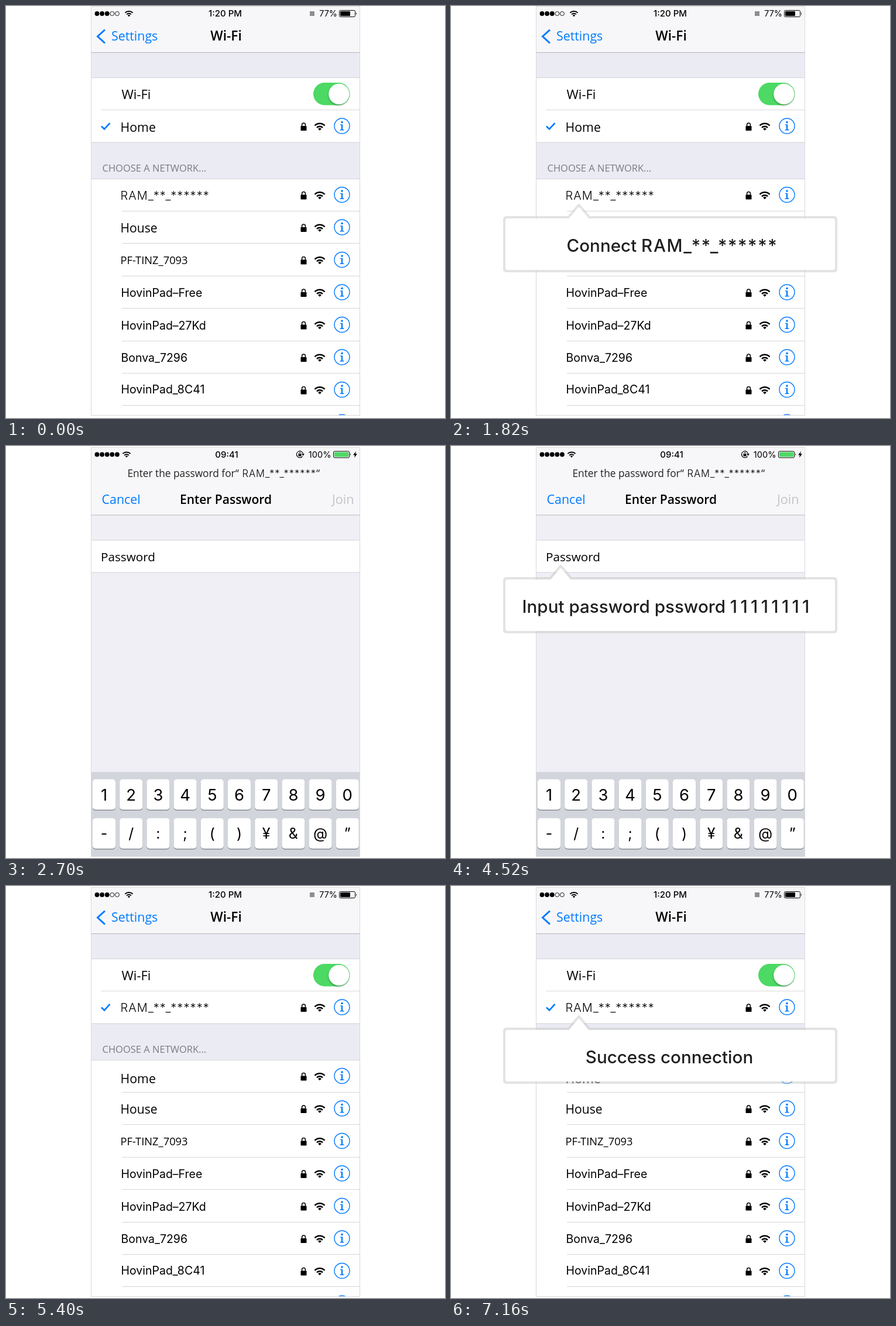
An HTML page for the animation above (8000 ms loop, 750 by 704 pixels).

```html
<!DOCTYPE html>
<html lang="en">
<head>
<meta charset="utf-8">
<title>Joining a Wi-Fi network</title>
<style>
html, body { margin: 0; width: 100%; height: 100%; overflow: hidden; background: #fff; }
svg { display: block; width: 750px; height: 704px; }
text { white-space: pre; }
.ui { font-family: "Open Sans", "Noto Sans", sans-serif; }
.sys { font-family: Inter, Roboto, sans-serif; }
.medium { font-weight: 500; }
.bold { font-weight: 600; }
.mid { text-anchor: middle; }
.end { text-anchor: end; }
.blue { fill: #007aff; }
.line { fill: none; stroke: #007aff; }
.mask { letter-spacing: .055em; }
.ones { letter-spacing: .18em; }
.scene { visibility: hidden; animation: 8s step-end infinite; }
#list { animation-name: list; }
#pick { animation-name: pick; }
#form { animation-name: form; }
#type { animation-name: type; }
#done { animation-name: done; }
#joined { animation-name: joined; }
@keyframes list   { 0% { visibility: visible } 33.75%, 100% { visibility: hidden } }
@keyframes pick   { 0% { visibility: hidden } 6.25% { visibility: visible } 33.75%, 100% { visibility: hidden } }
@keyframes form   { 0% { visibility: hidden } 33.75% { visibility: visible } 67.5%, 100% { visibility: hidden } }
@keyframes type   { 0% { visibility: hidden } 40% { visibility: visible } 67.5%, 100% { visibility: hidden } }
@keyframes done   { 0% { visibility: hidden } 67.5%, 100% { visibility: visible } }
@keyframes joined { 0% { visibility: hidden } 73.75%, 100% { visibility: visible } }
</style>
</head>
<body>
<svg id="stage" viewBox="0 0 750 704" xmlns="http://www.w3.org/2000/svg">
  <defs>
    <clipPath id="phone"><rect x="145" y="0" width="460" height="700"/></clipPath>
    <filter id="soft" x="-30%" y="-30%" width="160%" height="160%"><feGaussianBlur stdDeviation="1.6"/></filter>
    <g id="fan">
      <path d="M0 6.8L-2.9 3.9A4.1 4.1 0 0 1 2.9 3.9Z"/>
      <path d="M-5 1.8A7.1 7.1 0 0 1 5 1.8M-8.5 -1.7A12 12 0 0 1 8.5 -1.7" fill="none" stroke="#000" stroke-width="2.5"/>
    </g>
    <g id="lock">
      <rect x="-5" y="-1" width="10" height="8" rx=".8"/>
      <path d="M-2.9 0V-3.2A2.9 2.9 0 0 1 2.9 -3.2V0" fill="none" stroke="#000" stroke-width="1.5"/>
    </g>
    <g id="info">
      <circle r="13" class="line" stroke-width="1.4"/>
      <circle cy="-6.4" r="1.8" class="blue"/>
      <path class="blue" d="M-3.2 -2.8H1.2V6H3.4V7.4H-3.4V6H-1.2V-1.4H-3.2Z"/>
    </g>
    <g id="icons">
      <use href="#lock" x="508.5" y="1"/>
      <use href="#fan" x="536" y="1"/>
      <use href="#info" x="574"/>
    </g>
  </defs>
</svg>
<script>
const stage = document.getElementById("stage");
const rect = (x, y, w, h, fill, more = "") =>
  `<rect x="${x}" y="${y}" width="${w}" height="${h}" fill="${fill}" ${more}/>`;
const rule = (y, x = 146, color = "#d3d3d8") => rect(x, y, 604 - x, 1, color);
const text = (s, x, y, size, cls, more = "") =>
  `<text x="${x}" y="${y}" font-size="${size}" class="${cls}" ${more}>${s}</text>`;
const times = (n, fn) => Array.from({ length: n }, (_, i) => fn(i)).join("");
const scene = (id, body, dy = 0) => `<g id="${id}" class="scene" transform="translate(0 ${dy})">${body}</g>`;
const frame = rect(145.5, .5, 459, 699, "none", 'stroke="#d9d9dc"');

const signal = (full, y, wifiX) =>
  times(5, i => i < full
    ? `<circle cx="${155.5 + i * 8.6}" cy="${y}" r="3.9"/>`
    : `<circle cx="${155.5 + i * 8.6}" cy="${y}" r="3.5" fill="none" stroke="#000" stroke-width=".9"/>`) +
  `<use href="#fan" transform="translate(${wifiX} ${y}) scale(.78)"/>`;

const battery = (x, y, w, fill) =>
  rect(x + .5, y + .5, 27, 11, "none", 'rx="2" stroke="#000"') +
  rect(x + 2, y + 2, w, 8, fill, 'rx=".8"') +
  `<path d="M${x + 29} ${y + 4}q2 2 0 4z"/>`;

// Each name: text, class, size, x, weight, baseline below the row centre
const mask = "RAM_**_******";
const ram = [mask, "sys mask", 20, 195.5, 300];
const home = ["Home", "ui", 21.3, 195.5, 400];
const others = [
  ["House", "ui", 21.1, 195.5, 400, 9],
  ["PF-TINZ_7093", "ui", 18.3, 195.5, 400, 7],
  ["HovinPad–Free", "sys", 19.5, 196.5, 400, 8],
  ["HovinPad–27Kd", "sys", 19.5, 196.5, 400, 8],
  ["Bonva_7296", "sys", 19.5, 196.5, 400, 8],
  ["HovinPad_8C41", "sys", 19.5, 196.5, 400, 6]
];
const label = ([s, cls, size, x, weight], y) => text(s, x, y, size, cls, `font-weight="${weight}"`);

function listScreen(joined, joinedY, first, firstY) {
  const rowY = i => 322.5 + 55.5 * i;
  return `<g clip-path="url(#phone)">` +
    rect(146, 0, 458, 79, "#f7f7f9") + rule(79, 146, "#b4b4b9") +
    rect(146, 80, 458, 42, "#ebebf4") + rule(122) +
    rect(146, 123, 458, 577, "#fff") + rule(177, 162, "#d9d9dc") +
    rect(146, 233, 458, 62, "#ebebf4") + rule(232.5) + rule(295) +
    signal(3, 13, 210) +
    text("1:20 PM", 374.5, 18, 15, "sys medium mid") +
    rect(519, 9, 8, 8, "#8e8e92") +
    text("77%", 566, 18, 14.4, "sys end") + battery(569, 7, 17, "#000") +
    `<path class="line" d="M169 40.5L156.5 52L169 63.5" stroke-width="3"/>` +
    text("Settings", 180, 59, 21.4, "ui blue") +
    text("Wi-Fi", 376, 59, 22.7, "ui bold mid") +
    text("Wi-Fi", 197.5, 159, 22, "ui") +
    rect(525, 131, 62.5, 38.5, "#4cd964", 'rx="19.25"') +
    `<circle cx="568.5" cy="152.5" r="17.5" fill="#000" opacity=".28" filter="url(#soft)"/>
     <circle cx="568.9" cy="150.4" r="17.7" fill="#fff"/>
     <path class="line" d="M163 205.5L168 210.3L177.5 200" stroke-width="2.6"/>
     <use href="#icons" y="205"/>` +
    label(joined, joinedY) +
    text("CHOOSE A NETWORK...", 164.5, 283, 16.5, "ui", 'fill="#7b7b80"') +
    label(first, firstY) +
    others.map((n, i) => label(n, rowY(i + 1) + n[5])).join("") +
    times(8, i => `<use href="#icons" y="${rowY(i)}"/>`) +
    times(7, i => rule(Math.floor(350.2 + 55.45 * i), 198, "#d6d6d9")) +
    frame + `</g>`;
}

function key(char, i, row) {
  const x = 148 + i * 46.2, y = row ? 634 : 567.5;
  return rect(x, y + 1.4, 39, 52, "#898c91", 'rx="5"') + rect(x, y, 39, 52, "#fff", 'rx="5"') +
    text(char, x + 19.5, row ? 669 : 604, row ? 25 : 27.5, "sys mid");
}

const keys = ["1234567890", "-/:;()¥&@”"].map((chars, row) =>
  [...chars].map((c, i) => key(c === "&" ? "&amp;" : c, i, row)).join("")).join("");

const formScreen =
  rect(146, 0, 458, 700, "#efeff5") +
  rect(146, 0, 458, 116, "#f7f7f9") + rule(115.5, 146, "#b8b8bd") +
  rect(146, 159, 458, 55, "#fff") + rule(158.5) + rule(213.5) +
  rect(146, 555, 458, 145, "#d2d5dc") + keys +
  signal(5, 12.5, 206) +
  text("09:41", 377, 17.5, 15, "sys medium mid") +
  `<g fill="none" stroke="#000" stroke-width="1.2">
     <path d="M506.6 15.6A5.6 5.6 0 1 1 507.6 11.6"/>
     <path d="M500.6 12V10.6a1.5 1.5 0 0 1 3 0V12" stroke-width="1"/>
   </g>
   <path d="M499.5 11.8h5v3.8h-5zM505 11.6h5l-2.5 3.2z"/>` +
  text("100%", 555.5, 17.5, 14.6, "sys end") + battery(559, 6.5, 24, "#4cd964") +
  `<path d="M598 7L593 13.4H596L595 18L600 11.4H597Z"/>` +
  text("Enter the password for“", 207.5, 50.5, 17.3, "ui", 'fill="#222"') +
  text(mask, 403.5, 50.5, 16.6, "sys mask", 'font-weight="300"') +
  text("“", 530, 50.5, 17.3, "ui", 'fill="#222"') +
  text("Cancel", 163.5, 97, 21.4, "ui blue") +
  text("Enter Password", 375.5, 96.5, 21, "ui bold mid") +
  text("Join", 594.5, 97, 21.6, "ui end", 'fill="#c4c4c8"') +
  text("Password", 162, 194.5, 20.7, "ui") + frame;

// Speech box outline, inset by d, pointing up at x
function bubble(x, top, d, fill) {
  const l = 89 + d, r = 660 - d, t = top + d, b = top + 96 - d, c = 6 - d / 2;
  const tip = top - 22.5 + d * 1.55, half = (t - tip) * .83;
  return `<path fill="${fill}" d="M${l + c} ${t}H${x - half}L${x - 2} ${tip + 2.4}Q${x} ${tip} ${x + 2} ${tip + 2.4}
    L${x + half} ${t}H${r - c}Q${r} ${t} ${r} ${t + c}V${b - c}Q${r} ${b} ${r - c} ${b}
    H${l + c}Q${l} ${b} ${l} ${b - c}V${t + c}Q${l} ${t} ${l + c} ${t}Z"/>`;
}
const callout = (x, top, s, textX, cls = "") =>
  bubble(x, top, 0, "rgba(199,199,199,.5)") + bubble(x, top, 4, "#fff") +
  text(s, textX, top + 61, 29.6, "sys medium " + cls, 'fill="#1f1f1f"');

stage.insertAdjacentHTML("beforeend",
  scene("list", listScreen(home, 215, ram, 331)) +
  scene("pick", callout(218.5, 359, `Connect <tspan class="mask">${mask}</tspan>`, 197.5)) +
  scene("form", formScreen, 2) +
  scene("type", callout(187.5, 224, 'Input password pssword <tspan class="ones">11111111</tspan>', 121.5)) +
  scene("done", listScreen(ram, 213, home, 335), 2) +
  scene("joined", callout(218.5, 242, "Success connection", 373, "mid")));
</script>
</body>
</html>
```
